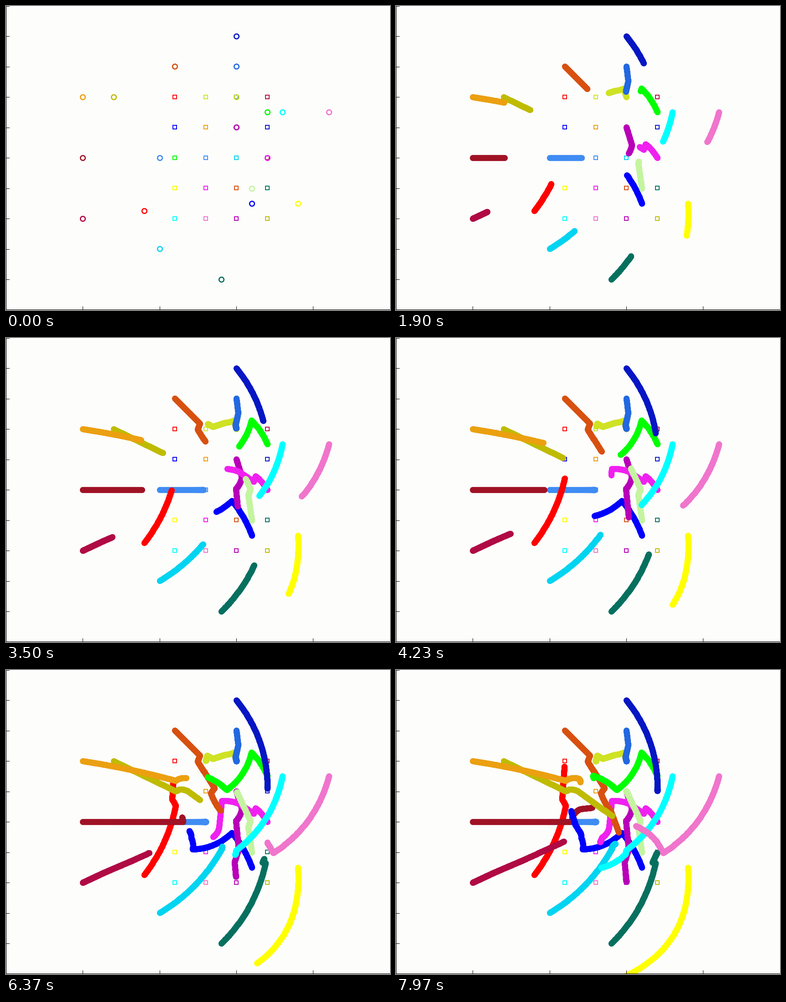
These frames come from a looping animation (842x665 px, 8 s). A matplotlib script:

```python
import numpy as np
import matplotlib.pyplot as plt
from matplotlib.animation import FuncAnimation

W, H, DPI = 842, 665, 100
PT = 72 / DPI                # points per pixel
FRAMES, INTERVAL = 250, 32
STEP = 1 / 30                # seconds between two rings of a trail
TIMES = np.arange(240) * STEP
SPEED = 37.5                 # cruising speed in pixels per second
BRAKE = 33.7                 # robots slow down within this range of their goal

fig = plt.figure(figsize=(W / DPI, H / DPI), dpi=DPI, facecolor="#fdfdfc")
ax = fig.add_axes([0, 0, 1, 1])
ax.set_xlim(0, W)
ax.set_ylim(H, 0)
ax.axis("off")

trails = []


def goal_at(col, row):
    return np.array([int(370 + 67.6 * col + 0.5), int(199 + 66.5 * row)])


def arc(a, b, bend):
    """Points from a to b on a parabola that bulges by bend to the right."""
    a, b = np.array(a, float), np.array(b, float)
    d = b - a
    normal = np.array([-d[1], d[0]]) / np.hypot(*d)
    u = np.linspace(0, 1, 200)[:, None]
    return a + d * u + normal * bend * 4 * u * (1 - u)


def travel(start, goal, legs, pace):
    """Position at each time: cruise along the legs, brake near the goal."""
    points, clock = [np.array([start], float)], [np.zeros(1)]
    for x, y, bend, rate in [*legs, (*goal, 0, pace)]:
        p = arc(points[-1][-1], (x, y), bend)
        ds = np.hypot(*np.diff(p, axis=0).T)
        left = np.hypot(*((p[1:] + p[:-1]) / 2 - goal).T)
        v = SPEED * np.minimum(rate, left / BRAKE)
        points.append(p[1:])
        clock.append(clock[-1][-1] + np.cumsum(ds / v))
    p, t = np.concatenate(points), np.concatenate(clock)
    return np.interp(TIMES, t, p[:, 0]), np.interp(TIMES, t, p[:, 1])


def leg(x, y, bend=0, pace=1):
    return x, y, bend, pace


def robot(color, start, cell, *legs, pace=1):
    goal = goal_at(*cell)
    ax.plot(*goal, "s", ms=8 * PT, mfc="none", mec=color, mew=1.9 * PT, zorder=1)
    line, = ax.plot([], [], "o", ms=10.6 * PT, mfc="none", mec=color,
                    mew=2.6 * PT, zorder=2 + len(trails))
    trails.append((line, travel(start, goal, legs, pace)))


# Listed from bottom to top; the short slow legs are sidesteps
robot("#3f8cf3", (337, 332), (1, 2))
robot("#ff0000", (303, 448), (0, 0),
      leg(372, 296, 10), leg(364, 283), pace=0.65)
robot("#a01225", (168, 332), (3, 2),
      leg(388, 332), leg(386, 321, pace=0.55), leg(404, 304, -2),
      leg(431, 301, pace=0.8))
robot("#0000ff", (539, 432), (0, 1),
      leg(495, 356, 4), leg(409, 392, -9), leg(406, 367, 2),
      leg(400, 350, 2, 0.55), leg(393, 338), pace=0.75)
robot("#b800b8", (505, 265), (2, 4),
      leg(517, 304), leg(504, 330, -2, 0.65), leg(510, 392, pace=0.87),
      leg(501, 420, pace=0.8))
robot("#f020f0", (573, 332), (1, 3),
      leg(547, 302, 2), leg(543, 314, pace=0.75), leg(510, 292, pace=0.83),
      leg(473, 286, 2), leg(467, 344, pace=0.9), leg(452, 366, -3, 0.8),
      pace=0.2)
robot("#c4f4a0", (539, 399), (2, 1),
      leg(531, 344), leg(536, 330, pace=0.3))
robot("#d8500f", (370, 132), (2, 3),
      leg(425, 187), leg(420, 200, pace=0.75), leg(457, 258, pace=0.93),
      leg(449, 269, pace=0.8), leg(470, 307, 2, 0.85), pace=0.85)
robot("#bfbb00", (236, 199), (3, 4),
      leg(372, 265, pace=0.92), leg(380, 261, pace=0.68),
      leg(397, 264, -1, 0.65), leg(475, 320))
robot("#eba010", (168, 199), (1, 1),
      leg(372, 242, -3), leg(387, 236, -1, 0.8), leg(401, 238, -1, 0.8),
      leg(404, 246, -1, 0.15))
robot("#cfe224", (505, 199), (1, 0),
      leg(499, 180), leg(481, 185, -1), leg(453, 194, pace=0.5),
      leg(441, 187, pace=0.5))
robot("#2268e0", (505, 132), (2, 0), leg(509, 164), leg(503, 190))
robot("#00ff00", (573, 232), (0, 2),
      leg(538, 180, 3), leg(484, 262, -9, 0.95), leg(471, 251, pace=0.47),
      leg(432, 231, 2), leg(433, 236, pace=0.1))
robot("#0516c4", (505, 66), (3, 1), pace=1, *[leg(573, 264, -19)])
robot("#00d4f0", (337, 531), (2, 2),
      leg(473, 391, 13, 0.96), leg(481, 380, -2, 0.15))
robot("#00ffff", (606, 232), (0, 4),
      leg(505, 394, -18, 0.96), leg(503, 403, pace=0.27), leg(448, 433, -4))
robot("#f075cc", (708, 232), (1, 4),
      leg(586, 400, -20), leg(572, 376), leg(523, 340, 4))
robot("#06705f", (472, 598), (3, 3),
      leg(569, 422, 15, 0.96), leg(562, 421, pace=0.75))
robot("#b00a44", (168, 465), (3, 0),
      leg(215, 443, pace=0.5), leg(283, 414, pace=0.73), leg(368, 375))
robot("#ffff00", (640, 432), (0, 3), leg(495, 673, -49))


def rule(xs, ys):
    ax.plot(xs, ys, color="black", lw=PT, zorder=50, snap=False,
            solid_capstyle="butt")


rule([0.5, 0.5], [0, H])
rule([0, W], [H - 0.5, H - 0.5])
for i in range(10):
    y = int(66.45 * i + 0.5) + 0.5
    rule([0, 8], [y, y])
for i in range(1, 5):
    x = int(168.3 * i + 0.5) + 0.5
    rule([x, x], [H - 8, H])


def draw(frame):
    n = int(frame * INTERVAL / 1000 / STEP + 1e-6) + 1
    for line, (x, y) in trails:
        line.set_data(x[:n], y[:n])
    return [line for line, _ in trails]


def reset():
    return draw(0)


anim = FuncAnimation(fig, draw, frames=FRAMES, init_func=reset,
                     interval=INTERVAL, repeat=True, repeat_delay=0)
plt.show()
```
